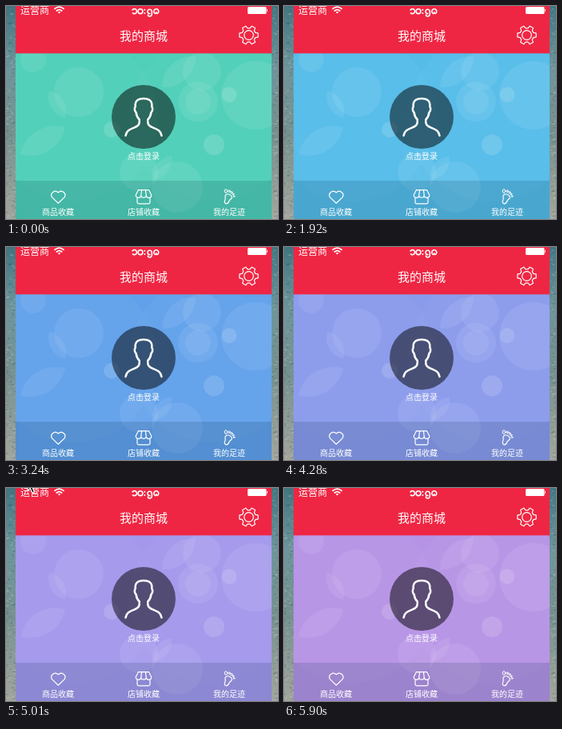
An HTML page for the animation above (6150 ms loop, 340 by 267 pixels).

```html
<!DOCTYPE html>
<html lang="zh">
<head>
<meta charset="utf-8">
<style>
html, body { margin: 0; width: 100%; height: 100%; overflow: hidden; background: #6b8a90; }
svg { display: block; width: 100vw; height: 100vh; }
text { font-family: "Noto Sans CJK SC", "Noto Sans CJK", "Noto Sans", sans-serif; font-weight: 300; fill: #fff; }
.label { font-size: 10px; font-weight: 400; text-anchor: middle; }
.line { fill: none; stroke: #fff; stroke-linejoin: round; stroke-linecap: round; }
</style>
</head>
<body>
<svg viewBox="0 0 340 267" preserveAspectRatio="none" stroke-width="1.2">
  <defs>
    <linearGradient id="sea" x1="0" y1="0" x2="0" y2="1">
      <stop offset="0" stop-color="#437681"/>
      <stop offset=".3" stop-color="#6f959b"/>
      <stop offset=".6" stop-color="#76918f"/>
      <stop offset="1" stop-color="#a3a69d"/>
    </linearGradient>
    <clipPath id="panel"><rect x="12" y="59" width="320" height="208"/></clipPath>
  </defs>
  <rect width="340" height="267" fill="url(#sea)"/>
  <g id="foam"></g>
  <rect id="tint" x="12" y="59" width="320" height="208"/>
  <g id="bubbles" clip-path="url(#panel)" fill="#fff"></g>
  <rect x="12" y="219" width="320" height="48" fill="#04243a" opacity=".14"/>

  <!-- header -->
  <rect x="12" width="320" height="59.4" fill="#ef2643"/>
  <text x="18" y="9.5" font-size="12">运营商</text>
  <g class="line" stroke-width="1.7">
    <path d="M61 3.4Q66.5-1.2 72 3.4M63.3 6Q66.5 3.2 69.7 6"/>
  </g>
  <path d="M66.5 9.6L64.7 7.6Q66.5 6.2 68.3 7.6Z" fill="#fff"/>
  <g class="line" stroke-width="1.6">
    <path d="M158 5A3 3 0 1 1 160.6 9.6Q159 9.7 158.4 8.8"/>
    <circle cx="168" cy="6.7" r="2.9"/>
    <path d="M179.8 9.6A2.7 2.7 0 1 1 182.3 7V10.5Q182 13 179.5 12.9Q177.3 12.8 177.5 11"/>
    <path d="M186.6 9.5A3 3 0 1 1 189 9.5M186.6 9.5Q188 9.4 187.8 7.8"/>
  </g>
  <g fill="#fff">
    <circle cx="173.4" cy="4.7" r="1"/><circle cx="173.4" cy="9" r="1"/>
    <rect x="302" y="1" width="23.5" height="9" rx="1.5"/>
    <path d="M326 3.6Q328 5.5 326 7.4Z"/>
  </g>
  <text x="172" y="43.2" font-size="15" text-anchor="middle">我的商城</text>
  <path id="gear" class="line"/>
  <circle class="line" cx="303.5" cy="36.5" r="5.8"/>

  <!-- profile -->
  <circle cx="172" cy="139" r="40" opacity=".5"/>
  <path class="line" stroke-width="2.5" d="M149.5 162.5C150.5 156 155 154.5 160.5 152.3C166 150 167 148.5 166.8 142.5C163.8 139.5 163 137 162.6 133.5C160.3 131.5 160.4 127.5 161.8 126C160.8 119 165 116 172 116C179 116 183.2 119 182.2 126C183.6 127.5 183.7 131.5 181.4 133.5C181 137 180.2 139.5 177.2 142.5C177 148.5 178 150 183.5 152.3C189 154.5 193.5 156 194.5 162.5"/>
  <text class="label" x="172" y="191.8">点击登录</text>

  <!-- tabs -->
  <g class="line">
    <path d="M65.3 247.2L57.4 239.6A4.9 4.9 0 0 1 65.3 233.9A4.9 4.9 0 0 1 73.2 239.6Z"/>
    <path d="M165.5 230.6H178.5L181.8 237A3.3 3.3 0 0 1 175.2 237A3.2 3.2 0 0 1 168.8 237A3.3 3.3 0 0 1 162.2 237ZM169.6 230.6L168.8 237M174.4 230.6L175.2 237M164 240V246Q164 247.8 165.8 247.8H178.2Q180 247.8 180 246V240"/>
    <path d="M275 236.4C278 234.6 282.3 237.2 282.4 240C282.5 242 280 242.2 279 244.2C278.2 246.5 277.3 248 275.2 247.8C272.5 247.4 273 244.5 274 242.5C274.9 240.5 272.5 238.2 275 236.4Z"/>
    <g stroke-width="1">
      <ellipse cx="274.9" cy="232" rx="1.7" ry="2.3"/>
      <circle cx="279" cy="232.1" r="1.2"/><circle cx="281.8" cy="233.6" r="1.1"/>
      <circle cx="283.9" cy="235.8" r="1"/><circle cx="285" cy="238.5" r=".9"/>
    </g>
  </g>
  <text class="label" x="65" y="261.8">商品收藏</text>
  <text class="label" x="172" y="261.8">店铺收藏</text>
  <text class="label" x="279" y="261.8">我的足迹</text>

  <path id="cursor" d="M1 .8V15.2L4.3 12.2L6.8 18L9.4 16.9L7 11.3H11.6Z" stroke="#fff"/>
</svg>
<script>
const LOOP = 6150;
const $ = id => document.getElementById(id);
const add = (parent, d, attrs) => {
  const p = document.createElementNS("http://www.w3.org/2000/svg", "path");
  Object.entries({ d, ...attrs }).forEach(([k, v]) => p.setAttribute(k, v));
  $(parent).append(p);
};
const disc = (x, y, r, opacity) =>
  add("bubbles", `M${x - r} ${y}a${r} ${r} 0 1 0 ${2 * r} 0a${r} ${r} 0 1 0 ${-2 * r} 0Z`, { opacity });
const leaf = (x1, y1, x2, y2) => {
  const r = 0.68 * Math.hypot(x2 - x1, y2 - y1);
  add("bubbles", `M${x1} ${y1}A${r} ${r} 0 0 1 ${x2} ${y2}A${r} ${r} 0 0 1 ${x1} ${y1}Z`, { opacity: .08 });
};

// two huge faint discs, then large soft ones and small bright ones
for (const x of [85, 259]) disc(x, 140, 105, .025);
for (const [x, y, r] of [
  [34, 67, 16], [91, 108, 31], [312, 112, 43], [240, 120, 25], [240, 120, 16], [245, 82, 24],
  [279, 111, 9.5], [260, 174, 13], [132, 155, 10], [214, 227, 32], [166, 208, 24]
]) disc(x, y, r, r < 14 ? .14 : .08);
leaf(54, 106, 74, 140);
leaf(18, 186, 74, 152);
leaf(195, 102, 237, 63);
leaf(183, 218, 207, 188);

// speckled water on both edges
let seed = 7;
const rnd = () => (seed = seed * 16807 % 2147483647) / 2147483647;
for (let i = 0; i < 420; i++) {
  const x = i % 5 < 3 ? rnd() * 12 - 1 : 332 + rnd() * 8;
  add("foam", `M${x} ${rnd() * 267}h${1 + rnd() * 3}v1.3h-3z`,
    { fill: rnd() < .5 ? "#e4e8e2" : "#1f4852", opacity: rnd() * .3 });
}

// six-toothed gear
const gear = [];
for (let i = 0; i < 6; i++) {
  for (const [off, r] of [[-.36, 8.8], [-.2, 11.9], [.2, 11.9], [.36, 8.8]]) {
    const a = i * Math.PI / 3 + off;
    gear.push(`${303.5 + r * Math.cos(a)} ${36.5 + r * Math.sin(a)}`);
  }
}
$("gear").setAttribute("d", `M${gear.join("L")}Z`);

const run = (id, frames) => $(id).animate(frames, { duration: LOOP, iterations: Infinity });

run("tint", [
  [0, "#4fcfb8"], [1920, "#55bce8"], [3240, "#61a1eb"], [4280, "#8a9bec"],
  [4570, "#9b98ec"], [5610, "#af98ed"], [5900, "#b693e5"], [LOOP, "#b893e4"]
].map(([t, fill]) => ({ offset: t / LOOP, fill })));

const away = [-60, -60];
run("cursor", [
  [0, ...away], [4720, 296, 100], [4870, 277, -5], [5010, 26, -12], [5160, ...away],
  [5610, 212, 200], [5750, 245, 231], [5900, ...away], [LOOP, ...away]
].map(([t, x, y]) => ({
  offset: t / LOOP, transform: `translate(${x}px, ${y}px)`, easing: "steps(1, end)"
})));
</script>
</body>
</html>
```
